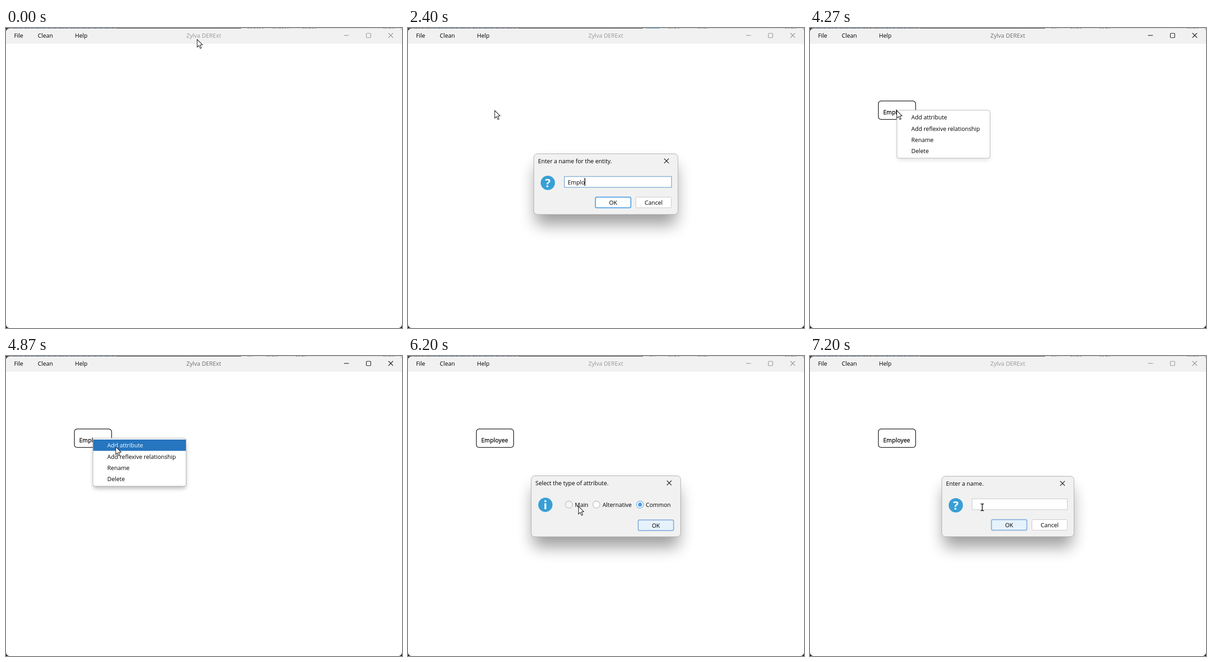
Recreate the animation shown at these times as an HTML page. Size 861 by 650 pixels, loop 8000 ms.

```html
<!DOCTYPE html>
<html lang="en">
<head>
<meta charset="utf-8">
<title>Zylva DERExt</title>
<style>
html, body { margin: 0; width: 100%; height: 100%; overflow: hidden; background: #fff; }
svg { display: block; width: 861px; height: 650px; }
text { font: 12.6px "Open Sans", "Noto Sans", sans-serif; fill: #000; white-space: pre; }
.mid { text-anchor: middle; }
.entity { letter-spacing: .15px; stroke: #000; stroke-width: .3px; }
.mark { font-size: 25px; font-weight: 700; fill: #fff; text-anchor: middle; }
.line { fill: none; stroke: #111; stroke-width: 1.2; }
.btn { fill: #fff; stroke: #c2c2c2; stroke-width: 1; }
.default { stroke: #4f9ee3; stroke-width: 2; }
.focus { fill: #e6f2fb; stroke: #87afda; stroke-width: 2; }
.press { fill: #e5e7eb; }
.field { fill: #fff; stroke: #c2c2c2; }
.field.on { stroke: #87afda; stroke-width: 1.6; }
.ring { fill: #fff; stroke: #b4b4b4; stroke-width: 1.2; }
.ring.hover { fill: #f5f5f5; }
.ring.on { stroke: #5fa3df; }
.ring.hot { fill: #e6f2fb; stroke: #87afda; }
.dot { fill: #4f9ee3; }
.shade { fill: #000; filter: blur(17px); }
#bar text { fill: #000; }
#bar .name { fill: #989898; }
#bar .line { stroke: #929292; }
#bar.active .name { fill: #6d6d6d; }
#bar.active .line { stroke: #111; }
</style>
</head>
<body>
<svg id="stage" viewBox="0 0 861 650" xmlns="http://www.w3.org/2000/svg"></svg>
<script>
const rect = (x, y, w, h, r, more) =>
  `<rect x="${x}" y="${y}" width="${w}" height="${h}" rx="${r}" ${more}/>`;
const text = (x, y, s, more = '') => `<text x="${x}" y="${y}" ${more}>${s}</text>`;
const cross = (x, y, r = 5) =>
  `<path class="line" d="M${x - r} ${y - r}l${2 * r} ${2 * r}m0 ${-2 * r}l${-2 * r} ${2 * r}"/>`;
const button = (x, y, s, cls = '', id = '') =>
  rect(x + .5, y + .5, 77, 23, 3, `class="btn ${cls}" id="${id}"`) +
  text(x + 39, y + 17, s, 'class="mid"');
const icon = (x, y, kind) => `<circle cx="${x}" cy="${y}" r="15.5" fill="#389fd6"/>` +
  (kind === '?' ? text(x, y + 9, '?', 'class="mark"')
    : rect(x - 2, y - 10, 4, 4, .8, 'fill="#fff"') + rect(x - 2, y - 3.5, 4, 13, .5, 'fill="#fff"'));
const radio = (x, s, id, labelX) =>
  `<circle class="ring" id="${id}Ring" cx="${x}" cy="322" r="7.6"/>` +
  `<circle class="dot" id="${id}Dot" cx="${x}" cy="322" r="4.5"/>` + text(labelX, 326.5, s);
const dialog = (id, x, y, w, h, title, body) => `<g id="${id}">` +
  rect(x + 4, y + 26, w - 8, h - 4, 8, 'class="shade"') +
  rect(x, y, w, h, 8, 'fill="#f1f1f1" stroke="#a9a9a9"') +
  text(x + 9.2, y + 20.5, title) + cross(x + w - 25, y + 15.5) + body + '</g>';
const marks = list => list.map(([x, w]) =>
  `<path d="M${x} .5h${w}" stroke="#777" stroke-dasharray="4 2 3 3 6 2"/>`).join('');

const items = ['Add attribute', 'Add reflexive relationship', 'Rename', 'Delete'];

stage.innerHTML =
  rect(0, 0, 861, 650, 0, 'fill="#262626"') +
  rect(511, 0, 350, 20, 0, 'fill="#d2d2d2"') +
  '<path d="M0 .5h240" stroke="#55708c" stroke-dasharray="5 3 8 4 3 2"/>' +
  `<g id="backA">${marks([[525, 35], [580, 34], [645, 29], [820, 25]])}</g>` +
  `<g id="backB">${marks([[525, 13], [566, 26], [630, 22], [820, 25]])}</g>` +
  '<path id="backBlue" d="M517 .5h30" stroke="#3f8fc4"/>' +
  rect(0, 1, 861, 649, 8, 'fill="#fff"') +
  '<path d="M0 34V9a8 8 0 0 1 8-8H853a8 8 0 0 1 8 8V34z" fill="#f1f1f1"/>' +
  '<g id="bar">' + text(17.5, 21, 'File') + text(69, 21, 'Clean') + text(150, 21, 'Help') +
  text(430, 21, 'Zylva DERExt', 'class="name mid"') +
  '<path class="line" d="M735 16h10.5"/>' + rect(783.5, 11.5, 9.5, 9.5, 1.5, 'class="line"') +
  cross(836.5, 16) + '</g>' +
  '<g id="entity">' + rect(148.6, 158.1, 81, 40, 6, 'fill="#fff" stroke="#000" stroke-width="1.25"') +
  text(159.2, 187, 'Employee', 'class="entity"') + '</g>' +
  dialog('entityBox', 273.5, 272.5, 313.5, 131.5, 'Enter a name for the entity.',
    icon(304, 335.5, '?') + rect(340, 321.7, 233, 23.6, 0, 'class="field on"') +
    text(347.2, 339, '', 'id="typed"') + '<path id="caret" d="M0 325v17" stroke="#000" stroke-width="1.6"/>' +
    button(407, 366, 'OK', 'default', 'okEntity') + button(495, 366, 'Cancel')) +
  dialog('typeBox', 267.8, 259.5, 325, 132.3, 'Select the type of attribute.',
    icon(298.7, 322.4, 'i') + radio(349.9, 'Main', 'main', 362.8) +
    radio(409.6, 'Alternative', 'alt', 422.9) + radio(504.5, 'Common', 'common', 517) +
    button(500, 354.8, 'OK', 'focus', 'okType')) +
  dialog('nameBox', 286.5, 260.5, 287.5, 131, 'Enter a name.',
    icon(317, 323.5, '?') + rect(352.5, 309.5, 207, 23.5, 0, 'class="field"') +
    button(394, 354, 'OK', 'focus') + button(482, 354, 'Cancel')) +
  '<g id="menu">' + rect(190, 186, 201, 101, 5, 'fill="#000" opacity=".28" id="menuShade" style="filter:blur(5px)"') +
  rect(189, 178, 202.5, 104, 4, 'fill="#fff" stroke="#b0b0b0"') +
  rect(189.5, 181, 201.5, 24.5, 0, 'fill="#2675bf" id="pick"') +
  items.map((s, i) => text(220.3, 198.3 + i * 24.3, s, i ? '' : 'id="firstItem"')).join('') + '</g>' +
  '<path id="arrow" d="M.6 .8V17.4L4.4 13.9 7.3 20.4 9.9 19.3 7.1 12.9 12.2 12.4Z" fill="#fff" stroke="#111" stroke-width="1.1"/>' +
  '<path id="beam" d="M371 320.5h2.5l1 1 1-1h2.5M374.5 321v13M371 335h2.5l1-1 1 1h2.5" fill="none" stroke="#000" stroke-width="1.5"/>';

const $ = id => document.getElementById(id);
const show = (id, on) => $(id).style.display = on ? '' : 'none';
const smooth = p => (p = Math.min(1, Math.max(0, p)), p * p * (3 - 2 * p));
const typedAt = [24, 26, 30, 32, 35, 43, 48, 51];

// Pointer legs: first tick, last tick, end point.
const legs = [[3, 8, 188, 178], [70, 73, 238, 196], [85, 92, 370, 325]];
function pointer(n) {
  let x = 415, y = 24;
  for (const [a, b, tx, ty] of legs) {
    const p = smooth((n - a) / (b - a));
    x += (tx - x) * p;
    y += (ty - y) * p;
  }
  return [x, y];
}

function place(id, cx, cy, s, alpha, shade) {
  const d = 1 - s, el = $(id);
  el.setAttribute('transform',
    `translate(${cx - 70 * d} ${cy - 28 * d}) scale(${s}) translate(${-cx} ${-cy})`);
  el.setAttribute('opacity', alpha);
  el.firstChild.setAttribute('opacity', shade);
}

// Dialogs spring open from slightly small.
function popup(id, cx, cy, n, from, to) {
  const k = n - from + .5;
  show(id, n >= from && n < to);
  place(id, cx, cy, k >= 4.5 ? 1 : 1 - .081 * Math.exp(-.56 * k), Math.min(1, k), .38);
}

function render(n) {
  const [x, y] = pointer(n);
  $('arrow').setAttribute('transform', `translate(${x} ${y})`);
  show('arrow', n < 105);
  show('beam', n >= 105);

  $('bar').classList.toggle('active', n >= 11 && n < 16 || n >= 57 && n < 80);
  show('backA', n < 14);
  show('backB', n >= 14);
  show('backBlue', n >= 36 && n < 64);
  show('entity', n >= 57);

  popup('entityBox', 430, 338, n, 17, 60);
  if (n >= 57) {
    const k = n - 57;
    place('entityBox', 430, 338, 1 - .025 * k, 1 - .38 * k, .22);
  }
  const count = typedAt.filter(t => n >= t).length;
  $('typed').textContent = 'Employee'.slice(0, count);
  const end = count ? $('typed').getComputedTextLength() : 0;
  $('caret').setAttribute('transform', `translate(${347.3 + end} 0)`);
  $('okEntity').classList.toggle('press', n >= 56);

  show('menu', n >= 64 && n < 80);
  $('menuShade').setAttribute('opacity', .28 * Math.min(1, (n - 63) / 3));
  const picked = n >= 71;
  show('pick', picked);
  $('firstItem').style.fill = picked ? '#fff' : '#000';

  popup('typeBox', 430, 325.5, n, 80, 103);
  const chosen = n >= 99, held = n >= 95;
  show('mainDot', chosen);
  show('altDot', false);
  show('commonDot', !chosen);
  $('commonRing').classList.toggle('on', !chosen);
  $('mainRing').classList.toggle('hover', n >= 93);
  $('mainRing').classList.toggle('hot', held);
  $('okType').classList.toggle('focus', !held);
  $('okType').classList.toggle('default', held);

  popup('nameBox', 430, 325.5, n, 104, 121);
}

const start = performance.now();
let last = -1;
function loop() {
  const t = (performance.now() - start) % 8000;
  const n = Math.floor(t * .015 + .06) % 120;
  if (n !== last) render(last = n);
  requestAnimationFrame(loop);
}
loop();
</script>
</body>
</html>
```
